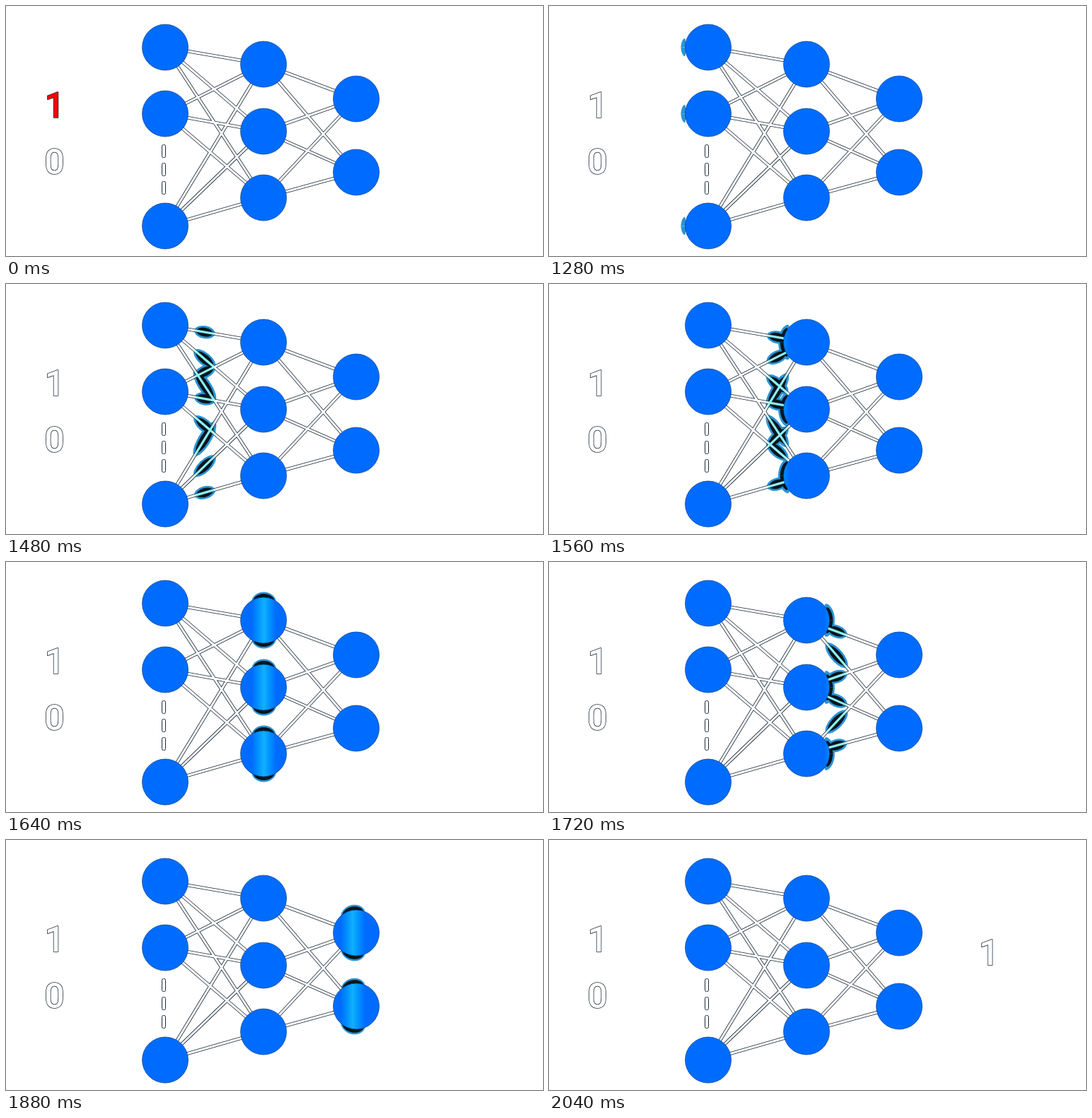
An HTML page with a canvas for the animation above (3100 ms loop, 759x354 px).

```html
<!DOCTYPE html>
<html lang="en">
<head>
<meta charset="utf-8">
<title>Neural network pulse</title>
<style>
  html, body { margin: 0; width: 100%; height: 100%; overflow: hidden; background: #fff; }
  canvas { display: block; }
</style>
</head>
<body>
<canvas id="stage" width="759" height="354"></canvas>
<script>
const ctx = document.getElementById('stage').getContext('2d');
const WIDTH = 759, HEIGHT = 354, LOOP = 3100, STEP = 40;
const PULSE_START = 1280, PULSE_END = 2040;
const RADIUS = 32.5, BAND = 17;
const BLUE = '#006cff', EDGE = '#1c2a38', GLOW_RIM = '#2a94d6', GLOW_CORE = '#04151e';

const layers = [
  [[225, 58.5], [225, 152.5], [225, 311.5]],
  [[364, 82.5], [364, 177.5], [364, 271.5]],
  [[495, 131.5], [495, 235.5]]
];
const nodes = layers.flat();
const links = layers.slice(1).flatMap((layer, i) =>
  layers[i].flatMap(from => layer.map(to => [from, to])));

function bandGradient(center, stops) {
  const gradient = ctx.createLinearGradient(center - BAND, 0, center + BAND, 0);
  stops.forEach(([at, color]) => gradient.addColorStop(at, color));
  return gradient;
}

function strokeLinks(style, width) {
  ctx.strokeStyle = style;
  ctx.lineWidth = width;
  ctx.beginPath();
  for (const [from, to] of links) {
    ctx.moveTo(...from);
    ctx.lineTo(...to);
  }
  ctx.stroke();
}

// Lens around each link where the pulse crosses it
function fillLinkGlow(center, halfWidth, thickness) {
  for (const [[x1, y1], [x2, y2]] of links) {
    if (center < x1 || center > x2) continue;
    const angle = Math.atan2(y2 - y1, x2 - x1);
    const y = y1 + (center - x1) * Math.tan(angle);
    ctx.beginPath();
    ctx.ellipse(center, y, halfWidth / Math.cos(angle), thickness, angle, 0, 2 * Math.PI);
    ctx.fill();
  }
}

// Swollen slice of each node under the pulse, tapering to the band's sides
function fillNodeGlow(center, halfWidth, swell) {
  for (const [nx, ny] of nodes) {
    if (Math.abs(center - nx) > RADIUS + halfWidth) continue;
    for (const side of [-1, 1]) {
      ctx.beginPath();
      ctx.moveTo(center - halfWidth, ny);
      for (let dx = -halfWidth; dx <= halfWidth; dx += 0.5) {
        const reach = RADIUS + swell * Math.sqrt(1 - (dx / halfWidth) ** 2);
        const x = center + dx;
        ctx.lineTo(x, ny + side * Math.sqrt(Math.max(0, reach ** 2 - (x - nx) ** 2)));
      }
      ctx.lineTo(center + halfWidth, ny);
      ctx.fill();
    }
  }
}

function drawGlow(center) {
  ctx.fillStyle = GLOW_RIM;
  fillLinkGlow(center, 14.5, 9);
  fillNodeGlow(center, BAND, 7.5);
  ctx.fillStyle = GLOW_CORE;
  fillLinkGlow(center, 11.5, 6.3);
  fillNodeGlow(center, 14.5, 5);
}

function drawNodes(center) {
  ctx.fillStyle = bandGradient(center, [
    [0, BLUE], [0.25, '#0090ff'], [0.5, '#12b0ff'], [0.75, '#0090ff'], [1, BLUE]
  ]);
  ctx.strokeStyle = '#023a86';
  ctx.lineWidth = 0.7;
  for (const [x, y] of nodes) {
    ctx.beginPath();
    ctx.arc(x, y, RADIUS, 0, 2 * Math.PI);
    ctx.fill();
    ctx.stroke();
  }
}

function drawDashes() {
  ctx.fillStyle = '#fff';
  ctx.strokeStyle = EDGE;
  ctx.lineWidth = 1;
  for (const y of [196.5, 222.5, 248.5]) {
    ctx.beginPath();
    ctx.roundRect(220.5, y, 5, 18, 2);
    ctx.fill();
    ctx.stroke();
  }
}

function drawDigit(digit, x, baseline, color = '#fff') {
  ctx.font = '500 50px Roboto, sans-serif';
  ctx.lineJoin = 'round';
  ctx.lineWidth = 1.5;
  ctx.strokeStyle = EDGE;
  ctx.strokeText(digit, x, baseline);
  ctx.fillStyle = color;
  ctx.fillText(digit, x, baseline);
}

function draw(time) {
  const pulsing = time >= PULSE_START && time < PULSE_END;
  const center = pulsing ? 239 + (time - 1400) * 0.5233 : -100;

  ctx.fillStyle = '#fff';
  ctx.fillRect(0, 0, WIDTH, HEIGHT);

  if (pulsing) drawGlow(center);
  strokeLinks(EDGE, 4.6);
  strokeLinks(bandGradient(center, [
    [0, '#fff'], [0.2, '#8ff6f0'], [0.8, '#8ff6f0'], [1, '#fff']
  ]), 3);
  drawNodes(center);
  drawDashes();

  drawDigit('1', 54.7, 157.5, time < PULSE_START ? '#f00' : '#fff');
  drawDigit('0', 54.2, 238);
  if (time >= PULSE_END) drawDigit('1', 607.7, 177);
}

const start = performance.now();
function tick() {
  const time = (performance.now() - start) % LOOP;
  draw(Math.floor(time / STEP) * STEP);
  requestAnimationFrame(tick);
}
tick();
</script>
</body>
</html>
```
